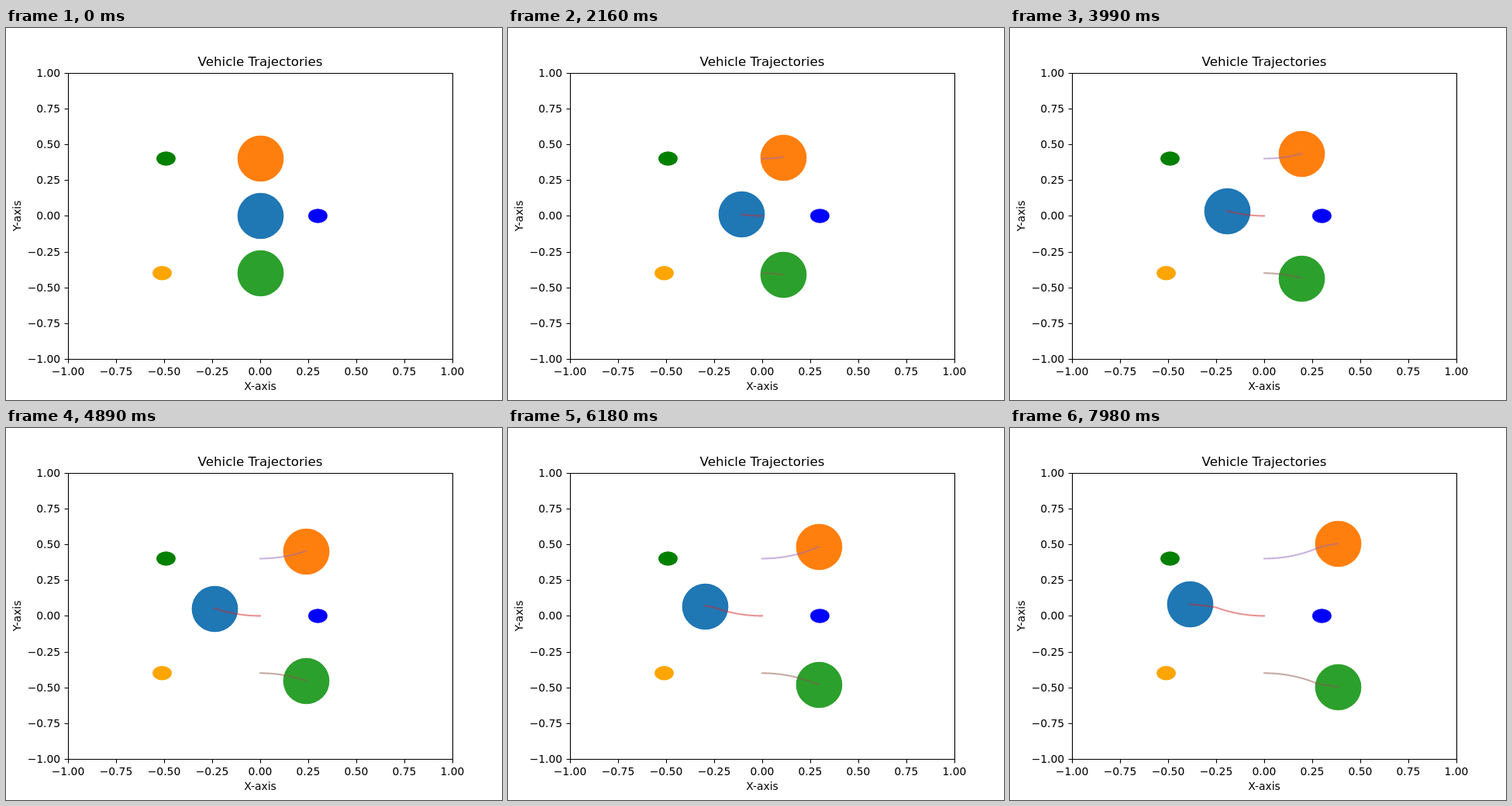
Animation, 640 px wide and 480 px high, one loop 8000 ms. Source, as an HTML page:

```html
<!DOCTYPE html>
<html lang="en">
<head>
<meta charset="utf-8">
<title>Vehicle Trajectories</title>
<style>
  html, body { margin: 0; width: 100%; height: 100%; overflow: hidden; background: #fff; }
  svg { display: block; width: 640px; height: 480px; }
  text { font: 13.889px "DejaVu Sans", sans-serif; fill: #000; }
  .title { font-size: 16.667px; }
  .mid { text-anchor: middle; }
  .end { text-anchor: end; }
  .axis { fill: none; stroke: #000; stroke-width: 1.11; }
  .trail { fill: none; stroke-width: 2.083; stroke-linecap: square; stroke-linejoin: round; stroke-opacity: .5; }
</style>
</head>
<body>
<svg id="stage" viewBox="0 0 640 480"></svg>
<script>
const LOOP = 8000, STEP = 30, STEPS = Math.floor(LOOP / STEP);
const SX = 248, SY = 184.8;     // pixels per data unit
const SPEED = 0.0015;           // data units per step
const TURN = 0.00268;           // radians per step
const RADIUS = 29.86;

const stage = document.getElementById('stage');
const px = x => 328 + x * SX;
const py = y => 242.4 - y * SY;
const snap = v => Math.floor(v + 0.5) + 0.5;

function add(tag, attrs, text) {
  const el = document.createElementNS('http://www.w3.org/2000/svg', tag);
  for (const key in attrs) el.setAttribute(key, attrs[key]);
  if (text) el.textContent = text;
  return stage.appendChild(el);
}

// Each vehicle turns steadily until step `hold`, then eases back to slope `rest`.
const vehicles = [
  { y: 0,    dx: -1, dy: 1,  fill: '#1f77b4', line: '#d62728', hold: 166, rest: 0.126, tau: 18 },
  { y: 0.4,  dx: 1,  dy: 1,  fill: '#ff7f0e', line: '#9467bd', hold: 189, rest: 0.090, tau: 50 },
  { y: -0.4, dx: 1,  dy: -1, fill: '#2ca02c', line: '#8c564b', hold: 180, rest: 0.162, tau: 25 }
];

function slope(v, n) {
  if (n <= v.hold) return Math.sin(TURN * n);
  const top = Math.sin(TURN * v.hold);
  return v.rest + (top - v.rest) * Math.exp((v.hold - n) / v.tau);
}

function route(v) {
  const pts = [[px(0), py(v.y)]];
  let x = 0, y = v.y;
  for (let n = 0; n < STEPS; n++) {
    const s = slope(v, n + 0.5);
    x += v.dx * SPEED * Math.sqrt(1 - s * s);
    y += v.dy * SPEED * s;
    pts.push([px(x), py(y)]);
  }
  return pts;
}

function drawAxes() {
  let d = 'M80.5 58.5H576.5V427.5H80.5Z';
  for (let i = 0; i <= 8; i++) {
    const value = i / 4 - 1;
    const label = (value < 0 ? '\u2212' : '') + Math.abs(value).toFixed(2);
    const x = snap(px(value)), y = snap(py(value));
    d += `M${x} 427.5V432.5M80.5 ${y}H75.5`;
    add('text', { class: 'mid', x: px(value), y: 448 }, label);
    add('text', { class: 'end', x: 70.2, y: Math.round(py(value) + 5) }, label);
  }
  add('path', { class: 'axis', d });
  add('text', { class: 'mid title', x: 328, y: 49 }, 'Vehicle Trajectories');
  add('text', { class: 'mid', x: 328, y: 467 }, 'X-axis');
  add('text', { class: 'mid', transform: 'translate(19 242.4) rotate(-90)' }, 'Y-axis');
}

for (const [x, y, fill] of [[0.3, 0, 'blue'], [-0.49, 0.4, 'green'], [-0.51, -0.4, 'orange']]) {
  add('ellipse', { cx: px(x), cy: py(y), rx: 0.05 * SX, ry: 0.05 * SY, fill });
}
for (const v of vehicles) {
  v.pts = route(v);
  v.disc = add('circle', { r: RADIUS, fill: v.fill });
}
for (const v of vehicles) v.trail = add('path', { class: 'trail', stroke: v.line });
drawAxes();

function render(time) {
  const n = Math.floor((time % LOOP) / STEP);
  for (const v of vehicles) {
    const [x, y] = v.pts[n];
    v.disc.setAttribute('cx', snap(x));
    v.disc.setAttribute('cy', snap(y));
    const path = v.pts.slice(0, n + 1).map(p => p[0].toFixed(2) + ' ' + p[1].toFixed(2));
    v.trail.setAttribute('d', n ? 'M' + path.join('L') : '');
  }
}

const start = performance.now();
function tick() {
  render(performance.now() - start);
  requestAnimationFrame(tick);
}
tick();
</script>
</body>
</html>
```
